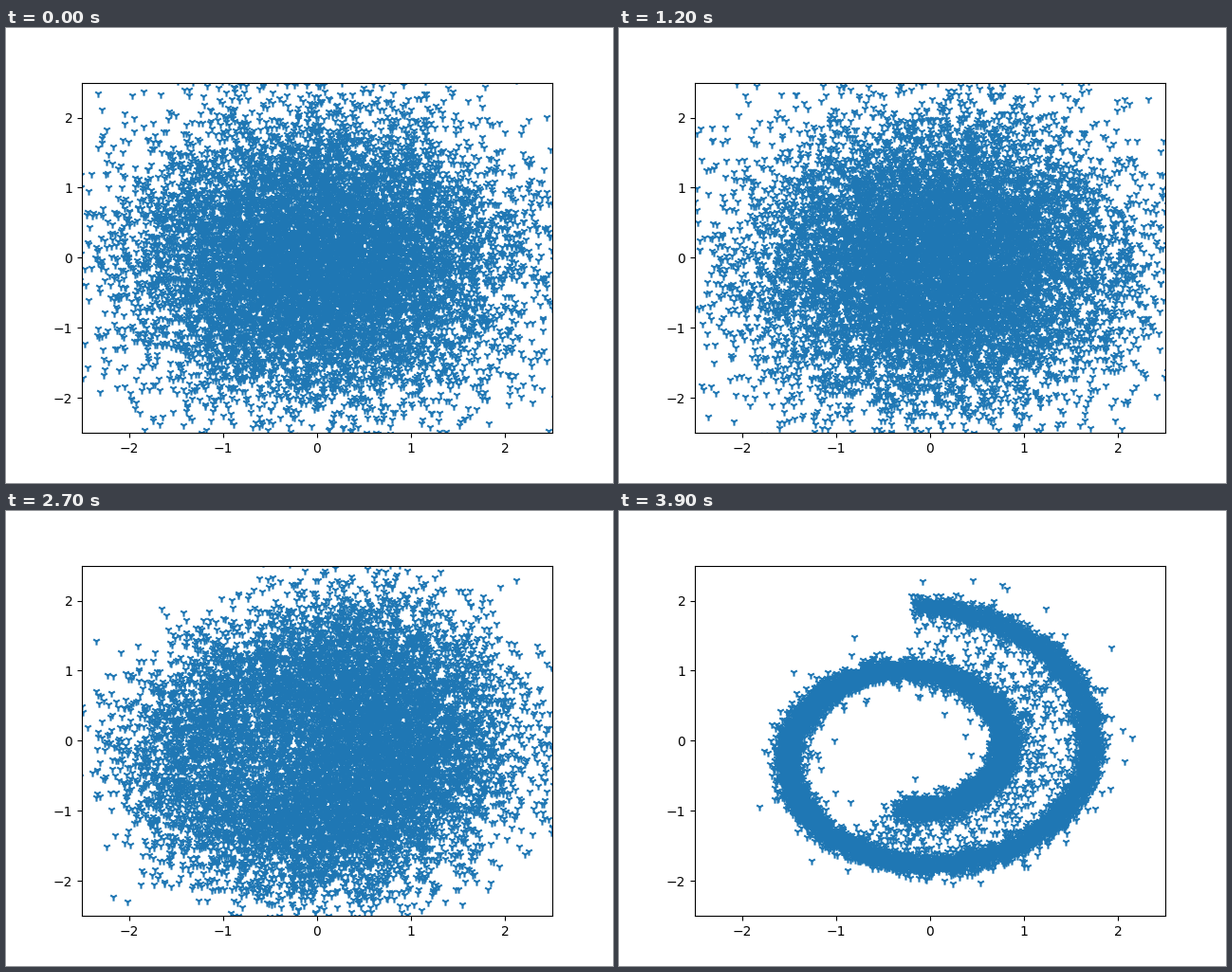
Animation, 640 px wide and 480 px high, one loop 4000 ms. Source, as a matplotlib script:

```python
import numpy as np
import matplotlib.pyplot as plt
from matplotlib.animation import FuncAnimation

POINTS = 11000
STEPS = 40
INTERVAL = 100
NOISE_RATE = 0.002

rng = np.random.default_rng(7)


def spiral(t):
    """Two-dimensional Swiss roll, slightly stretched at its inner end."""
    x = 0.146 * t * np.cos(t) - 0.13
    y = 0.147 * t * np.sin(t) - 0.14 - 0.15 * np.exp(4.7 - t)
    return np.column_stack([x, y])


def clean_samples():
    """Spiral points, with a few strays and some caught between the arms."""
    t = rng.uniform(1.44, 4.5, POINTS) * np.pi
    points = spiral(t)

    bridge = (t > 3.35 * np.pi) & (rng.random(POINTS) < 0.13)
    mix = rng.random((bridge.sum(), 1))
    inner = spiral(t[bridge] - 2 * np.pi)
    points[bridge] += mix * (inner - points[bridge])

    spread = np.where(rng.random(POINTS) < 0.03, 0.22, 0.075)
    return points + spread[:, None] * rng.normal(size=points.shape)


def diffusion_path():
    """Noise the spiral step by step, then reverse the order."""
    path = [clean_samples()]
    for k in range(1, STEPS):
        keep = np.exp(-NOISE_RATE * (2 * k - 1))
        noise = rng.normal(size=(POINTS, 2))
        path.append(np.sqrt(keep) * path[-1] + np.sqrt(1 - keep) * noise)
    return path[::-1]


path = diffusion_path()

fig, ax = plt.subplots(figsize=(6.4, 4.8), dpi=100)
ax.set(xlim=(-2.5, 2.5), ylim=(-2.5, 2.5))
cloud = ax.scatter(path[0][:, 0], path[0][:, 1], marker="1", color="#1f77b4")


def update(i):
    cloud.set_offsets(path[i])
    return (cloud,)


anim = FuncAnimation(fig, update, frames=STEPS, interval=INTERVAL,
                     repeat=True, repeat_delay=0)
plt.show()
```
